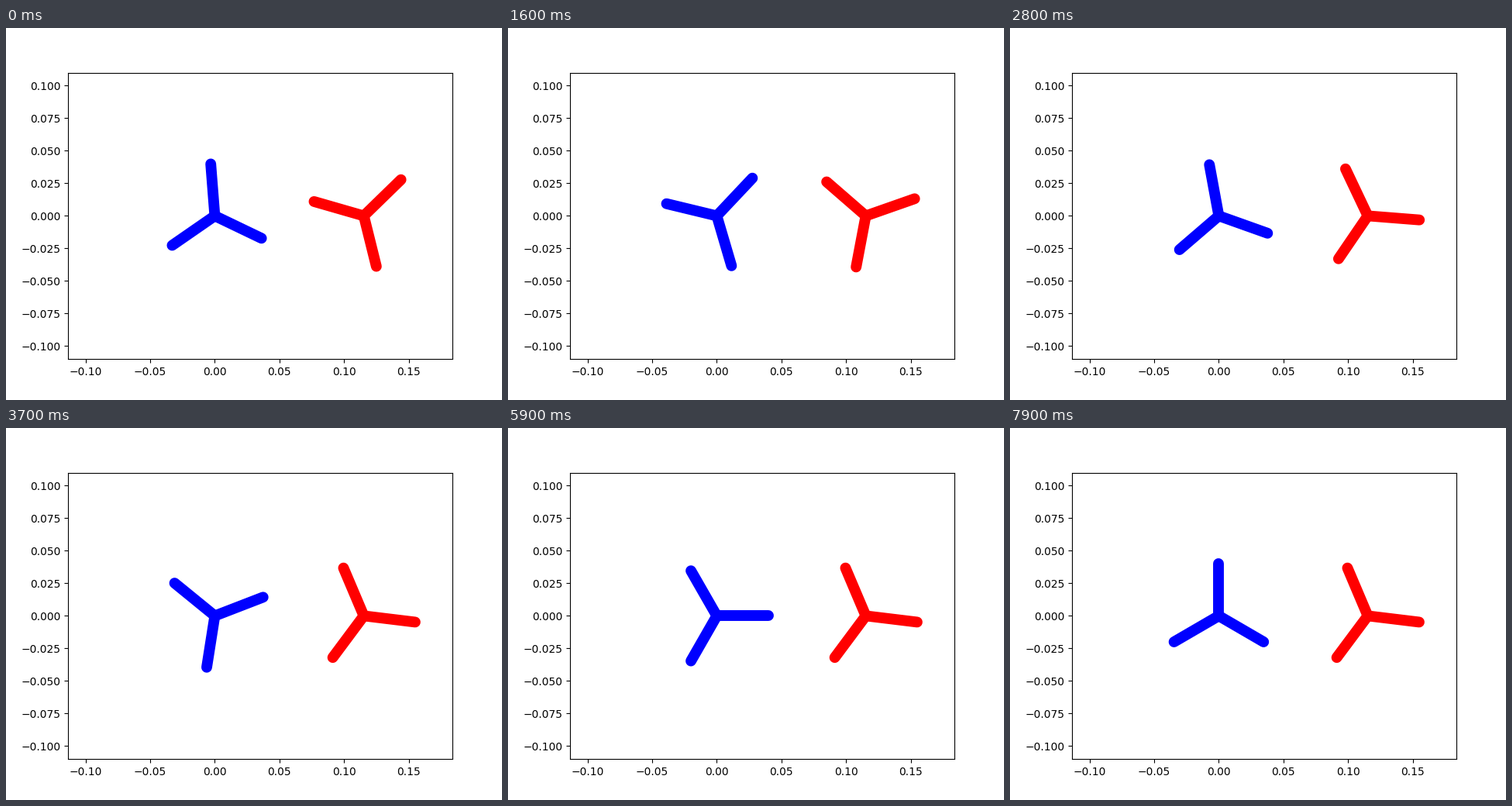
These frames come from a looping animation (640x480 px, 8 s). A matplotlib script:

```python
import numpy as np
import matplotlib.pyplot as plt
from matplotlib.animation import FuncAnimation

FRAMES = 80
INTERVAL = 100
ARM = 0.04
RED_X = 0.1152

fig, ax = plt.subplots(figsize=(6.4, 4.8), dpi=100)
ax.set_xlim(-0.11351, 0.18371)
ax.set_ylim(-0.11, 0.11)


def make_spinner(color):
    return [
        ax.plot([], [], color=color, lw=10, solid_capstyle="round")[0]
        for _ in range(3)
    ]


def pose(arms, cx, degrees):
    for k, arm in enumerate(arms):
        a = np.radians(degrees + 120 * k)
        arm.set_data([cx, cx + ARM * np.cos(a)], [0, ARM * np.sin(a)])


def blue_angle(i):
    return 4.5 * (i + 21)


def red_angle(i):
    # Swings clockwise, then comes to rest.
    return 18.9 - 26.2 * np.tanh((min(i, 36) - 16.1) / 8.3)


blue = make_spinner("blue")
red = make_spinner("red")


def update(i):
    pose(blue, 0, blue_angle(i))
    pose(red, RED_X, red_angle(i))
    return blue + red


anim = FuncAnimation(fig, update, frames=FRAMES, interval=INTERVAL,
                     repeat=True, repeat_delay=0)
plt.show()
```
